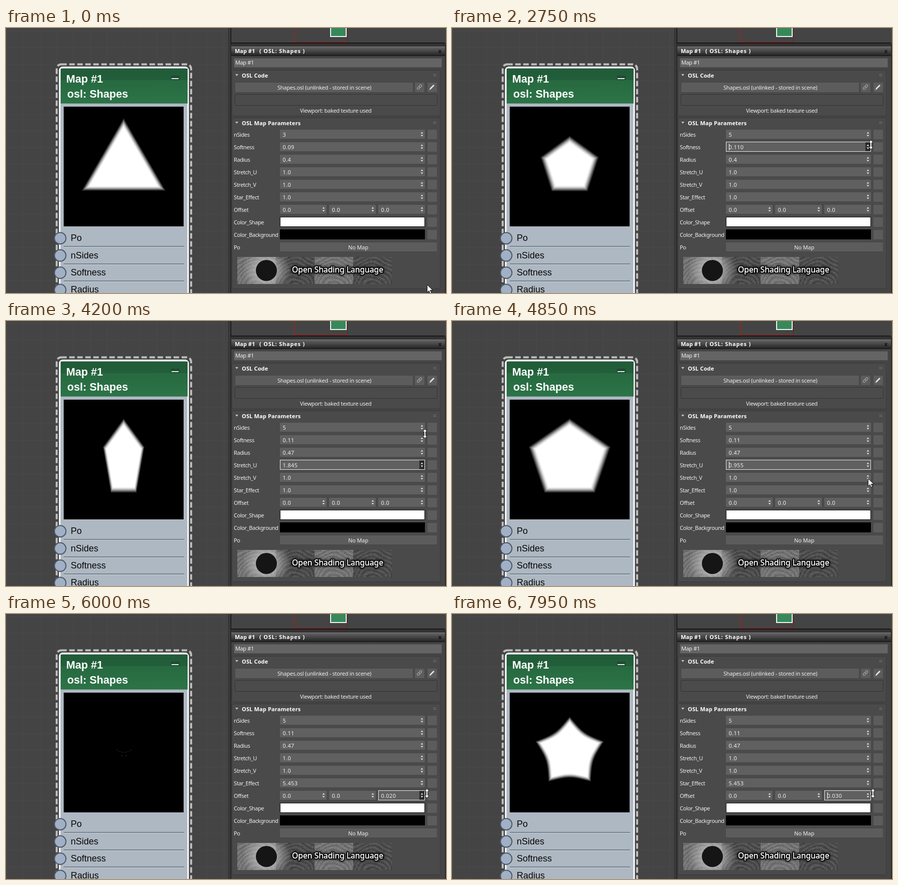
Recreate the animation shown at these times as an HTML page with a canvas. Size 877 by 529 pixels, loop 8 s.

```html
<!DOCTYPE html>
<html lang="en">
<head>
<meta charset="utf-8">
<title>Shape parameters</title>
<style>
html, body { margin: 0; width: 100%; height: 100%; overflow: hidden; background: #444; }
canvas { display: block; }
</style>
</head>
<body>
<canvas id="stage" width="877" height="529"></canvas>
<script>
const W = 877, H = 529, LOOP = 8000, STEP = 50, SIZE = 239;
const UI = '"Noto Sans", sans-serif', NODE = '"Liberation Sans", sans-serif';
const stage = document.getElementById('stage').getContext('2d');
const back = document.createElement('canvas');
back.width = W;
back.height = H;
let c = back.getContext('2d');

const clamp = v => Math.min(1, Math.max(0, v));
const lerp = (a, b, k) => a + (b - a) * k;
const smooth = (a, b, v) => {
  const k = clamp((v - a) / (b - a));
  return k * k * (3 - 2 * k);
};
const rowY = row => 212 + row * 25;

function rect(x, y, w, h, fill) {
  c.fillStyle = fill;
  c.fillRect(x, y, w, h);
}
function box(x, y, w, h, r, fill, line, width = 1) {
  c.beginPath();
  c.roundRect(x, y, w, h, r);
  if (fill) { c.fillStyle = fill; c.fill(); }
  if (line) { c.strokeStyle = line; c.lineWidth = width; c.stroke(); }
}
function poly(points, fill, line) {
  c.beginPath();
  points.forEach(([x, y]) => c.lineTo(x, y));
  c.closePath();
  c.fillStyle = fill;
  c.fill();
  if (line) { c.strokeStyle = line; c.lineWidth = 1; c.stroke(); }
}
function disc(x, y, r, fill, line) {
  c.beginPath();
  c.arc(x, y, r, 0, 7);
  c.fillStyle = fill;
  c.fill();
  if (line) { c.strokeStyle = line; c.lineWidth = 2; c.stroke(); }
}
function text(s, x, y, { size = 11, bold = false, font = UI, color = '#f0f0f0', gap = -0.4, align = 'left' } = {}) {
  c.font = `${bold ? 'bold ' : ''}${size}px ${font}`;
  c.letterSpacing = gap + 'px';
  c.textAlign = align;
  c.fillStyle = color;
  c.fillText(s, x, y);
}
function vertical(y0, y1, ...colors) {
  const g = c.createLinearGradient(0, y0, 0, y1);
  colors.forEach((col, i) => g.addColorStop(i / (colors.length - 1), col));
  return g;
}

// ---- Static interface ----
function drawNode() {
  rect(0, 0, 444, H, '#444444');
  for (let i = 0; i < 16; i++) {
    rect(Math.round(1 + i * 33.3), 0, 1, H, '#494949');
    rect(0, Math.round(5 + i * 33.3), 444, 1, '#494949');
  }
  c.setLineDash([11, 5]);
  box(101, 72.5, 268, 520, 9, null, '#bcbcbc', 4);
  c.setLineDash([]);
  box(107, 78.5, 256, 520, 6, '#aeb8c2', '#ffffff', 3);
  rect(109, 81, 253, 70, vertical(81, 151, '#27643f', '#286c42', '#2c7447'));
  rect(109, 81, 253, 23, 'rgba(20,70,40,.3)');
  rect(109, 150, 253, 1, '#55856a');
  rect(329, 95, 17, 9, '#1d4b30');
  rect(330, 100, 14, 2, '#e4ece7');
  const head = { size: 21.6, bold: true, font: NODE, color: '#fff', gap: 0 };
  text('Map #1', 120, 109, head);
  text('osl: Shapes', 122, 139, head);
  ['Po', 'nSides', 'Softness', 'Radius'].forEach((s, i) => {
    const y = 419.7 + i * 34.4;
    text(s, 129, Math.round(y + 5.5), { size: 18, font: NODE, color: '#080808', gap: 0 });
    rect(115, Math.round(y + 15.5), 240, 2, '#74828f');
    rect(115, Math.round(y + 17.5), 240, 1, '#cbd3da');
    disc(108, y, 11.5, '#a2b0c6', '#4b5969');
  });
}

function spinner(x, y, bg) {
  if (bg) rect(x - 5, y - 9, 10, 18, bg);
  [-1, 1].forEach(s => poly([[x - 2.5, y + s * 1.5], [x + 2.5, y + s * 1.5], [x, y + s * 4.5]], '#e8e8e8'));
}
function button(x, y, w, h) {
  box(x, y, w, h, 2, '#5c5c5c', '#484848');
}
function section(y, h, title) {
  box(450.5, y + 0.5, 415, h, 3, '#4a4a4a', '#3a3a3a');
  poly([[457, y + 8], [463, y + 8], [460, y + 12]], '#c4c4c4');
  text(title, 470, y + 15, { bold: true, gap: 0.15, color: '#fff' });
  for (let i = 0; i < 6; i++) rect(852 + i % 3 * 2, y + 8 + (i / 3 | 0) * 3, 1, 1, '#a0a0a0');
}

function drawBanner() {
  let seed = 7;
  const rnd = () => (seed = seed * 16807 % 2147483647) / 2147483647;
  for (let y = 0; y < 54; y++) for (let x = 0; x < 308; x++) {
    const tile = x / 77 | 0, u = x % 77;
    const wave = Math.sin(Math.hypot(u - 38, y - 60) * 0.8 + 2 * Math.sin(u / 9 + y / 14));
    const v = (tile % 2 ? 78 : 116) + wave * 11 + (rnd() - 0.5) * 30;
    rect(461 + x, 457 + y, 1, 1, `rgb(${v | 0},${v | 0},${v | 0})`);
  }
  const glow = c.createRadialGradient(519, 484, 14, 519, 484, 48);
  glow.addColorStop(0, 'rgba(205,205,205,.75)');
  glow.addColorStop(1, 'rgba(205,205,205,0)');
  rect(461, 457, 116, 54, glow);
  disc(519, 484, 21, '#151515');

  const title = 'Open Shading Language', style = { size: 15.7, gap: 0, color: '#fff' };
  c.save();
  c.shadowColor = '#000';
  c.shadowBlur = 5;
  c.lineJoin = 'round';
  c.strokeStyle = '#000';
  c.lineWidth = 3.5;
  text(title, 570, 488, style);
  c.strokeText(title, 570, 488);
  c.restore();
  text(title, 570, 488, style);
  c.strokeStyle = '#fff';
  c.lineWidth = 0.4;
  c.strokeText(title, 570, 488);
}

function drawPanel() {
  rect(443, 0, 6, H, '#2c2c2c');
  rect(444, 0, 3, H, '#3b3b3b');
  rect(449, 0, 428, H, '#444444');
  rect(448, 0, 1, 31, '#111');
  rect(449, 29, 426, 2, '#1a1a1a');
  rect(574, 28, 106, 1, '#a81010');
  rect(680, 0, 1, 29, '#6a2424');
  rect(574, 0, 1, 29, '#d40d0d');
  rect(646, 0, 33, 18, '#f2f2f2');
  rect(648, 0, 29, 16, '#37895a');

  rect(449, 31, 426, 6, '#333');
  rect(449, 37, 426, 19, vertical(37, 56, '#666', '#444', '#202020'));
  rect(449, 37, 426, 1, '#7c7c7c');
  rect(449, 55, 426, 1, '#161616');
  const title = { bold: true, gap: 0, color: '#fff' };
  text('Map #1', 456, 50, title);
  text('( OSL: Shapes )', 505, 50, { ...title, gap: 0.8 });
  text('x', 865, 50, { ...title, align: 'center', color: '#111' });
  rect(875, 31, 2, H, '#2a2a2a');
  rect(448, 37, 1, H, '#222');

  box(454.5, 60.5, 414, 18, 1, '#646464', '#525252');
  text('Map #1', 457, 73);

  section(84, 91, 'OSL Code');
  button(456.5, 108.5, 355, 20);
  text('Shapes.osl (unlinked - stored in scene)', 541, 123, { gap: -0.25 });
  button(814.5, 108.5, 20, 20);
  button(839.5, 108.5, 20, 20);
  c.save();
  c.translate(824, 118);
  c.rotate(-0.8);
  [-5.5, 0].forEach(x => box(x, -2, 6, 4, 2, null, '#a5a5a5', 1.2));
  c.restore();
  poly([[844, 124], [845, 120], [852, 113], [854, 115], [847, 122]], '#e0e0e0');
  box(456.5, 132.5, 403, 22, 1, '#4b4b4b', '#343434');
  text('Viewport: baked texture used', 586, 169, { gap: -0.32 });

  section(179, 341, 'OSL Map Parameters');
  ['nSides', 'Softness', 'Radius', 'Stretch_U', 'Stretch_V', 'Star_Effect',
    'Offset', 'Color_Shape', 'Color_Background', 'Po'].forEach((s, i) => {
    const y = rowY(i);
    text(s, 454, y + 5);
    if (i < 6) box(546, y - 9, 289, 18, 1, '#606060');
    if (i === 6) [546, 644, 742].forEach(x => box(x, y - 9, 93, 18, 1, '#606060'));
    if (i < 9) button(839.5, y - 9.5, 20, 20);
  });
  rect(546, 377, 289, 20, '#111');
  rect(547, 378, 287, 18, '#fff');
  rect(546, 402, 289, 20, '#000');
  button(545.5, 427.5, 314, 19);
  text('No Map', 702, 442, { align: 'center', gap: -0.1 });
  drawBanner();
}

// ---- Motion ----
// Each drag swings a value away and settles it at its new setting
const OFFSET = 6;
const DRAGS = [
  { row: 1, from: 0.09, to: 0.11, swing: 0.8, start: 1500, end: 2600, step: 0.01 },
  { row: 2, from: 0.4, to: 0.47, swing: 0.35, start: 2950, end: 3475, step: 0.01 },
  { row: 3, from: 1, to: 0.955, swing: 0.9, start: 3850, end: 4450, step: 0.005 },
  { row: 4, from: 1, to: 0.9, swing: 0.6, start: 4950, end: 5200, step: 0.005 },
  { row: 5, from: 1, to: 5.453, swing: 0, start: 5550, end: 5700, step: 0.001 },
  { row: OFFSET, from: 0, to: 0.02, swing: 0.3, start: 5850, end: 6000, step: 0.01 },
  { row: OFFSET, from: 0.02, to: 0.03, swing: -0.03, start: 6300, end: 6600, step: 0.01 },
  { row: OFFSET, from: 0.03, to: 0.03, swing: 0.03, start: 7250, end: 7600, step: 0.01 }
];
DRAGS.forEach((d, i) => {
  const next = DRAGS[i + 1];
  d.release = Math.min(d.end + 300, next ? next.start - 50 : LOOP);
});
const SELECT = 850, TYPED = 1000, RESET = 5450, SPIN_X = 835;

const progress = (d, t) => clamp((t - d.start) / (d.end - d.start));
const lastDrag = t => DRAGS.filter(d => t >= d.start).pop();
const isHeld = t => {
  const d = lastDrag(t);
  return !!d && t < d.release;
};

function value(row, t) {
  if (row === 0) return t < TYPED ? 3 : 5;
  if ((row === 3 || row === 4) && t >= RESET) return 1;
  const own = DRAGS.filter(d => d.row === row);
  const d = own.filter(o => t >= o.start).pop() || own[0];
  const k = progress(d, t);
  if (k === 0 || k === 1) return k ? d.to : d.from;
  const v = lerp(d.from, d.to, k) + d.swing * Math.sin(Math.PI * k);
  return Math.round(v / d.step) * d.step;
}

function drawShape(t) {
  const [n, soft, radius, su, sv, star, z] = [0, 1, 2, 3, 4, 5, 6].map(row => value(row, t - STEP));
  const img = c.createImageData(SIZE, SIZE), px = img.data, half = (SIZE - 1) / 2;
  const hidden = t >= 5950 && t < 6100;
  const mid = (radius - 0.4) * 240 + 43.5, soften = soft * 60;
  const pinch = (star - 1) / 4.453 * 0.155, shrink = 1 + 0.14 * (z / 0.03) ** 2;
  const slice = 2 * Math.PI / n;
  for (let j = 0, k = 0; j < SIZE; j++) for (let i = 0; i < SIZE; i++, k += 4) {
    px[k + 3] = 255;
    if (hidden) continue;
    const x = (i - half) * su, y = (j - half) * sv;
    let a = Math.atan2(x, y);
    a -= slice * Math.round(a / slice);
    const q = 2 * a / slice;
    const d = Math.hypot(x, y) * Math.cos(a) * shrink * (1 + pinch * (1 - q * q));
    px[k] = px[k + 1] = px[k + 2] = 255 * (1 - smooth(mid - soften, mid + soften, d)) ** 0.6;
  }
  c.putImageData(img, 115, 157);
  if (hidden) {
    for (let i = -2.5; i < 3; i++) rect(234 + i * 5.4, 275.5 - i * i * 0.7, 2, 1.5, '#2c2c2c');
    [230, 238].forEach(x => rect(x, 282, 2, 1.5, '#282828'));
  }
}

function plain(v) {
  const s = String(+v.toFixed(3));
  return s.includes('.') ? s : s + '.0';
}

function drawFields(t) {
  const drag = lastDrag(t), held = isHeld(t);
  const focus = drag ? drag.row : t >= SELECT ? 0 : -1;
  const caret = drag && t >= drag.end + 100 && (t % 650 < 400 || t % 650 >= 550);
  const field = (x, y, w, s, on) => {
    spinner(x + w - 6, y, on && held ? '#2a2a2a' : null);
    if (on) {
      c.strokeStyle = '#ededed';
      c.lineWidth = 1;
      c.strokeRect(x + 0.5, y - 9.5, w - 1, 19);
      if (!drag) rect(552, y - 6, 7, 13, '#2a8ae8');
    }
    text(s, x + 5.5, y + 5, { gap: 0.35 });
    if (on && caret) rect(x + 6, y - 6, 1, 13, '#fff');
  };
  for (let row = 0; row <= OFFSET; row++) {
    const v = value(row, t), on = row === focus, wide = row < OFFSET;
    const s = row === 0 ? String(v) : on ? v.toFixed(3) : plain(v);
    field(wide ? 546 : 742, rowY(row), wide ? 289 : 93, s, on);
  }
  [546, 644].forEach(x => field(x, rowY(OFFSET), 93, '0.0', false));
}

// Opening sweep: rest, node title, first field, on to the spinners
const SWEEP = [[200, 839, 512], [350, 232, 134], [650, 600, 213], [1150, 600, 213], [1400, 782, 247], [1500, 829, 238]];

function pointerAt(t) {
  const d = lastDrag(t);
  if (!d) {
    const i = SWEEP.findIndex(p => p[0] > t), b = SWEEP[i], a = SWEEP[Math.max(0, i - 1)];
    const k = clamp((t - a[0]) / (b[0] - a[0] || 1));
    return i ? [lerp(a[1], b[1], k), lerp(a[2], b[2], k)] : [a[1], a[2]];
  }
  const lift = d.swing ? 60 * Math.sin(Math.PI * progress(d, t)) : 0;
  const x = d.row === OFFSET ? SPIN_X + 4 : SPIN_X, y = rowY(d.row) - 4.5 - lift;
  const next = DRAGS[DRAGS.indexOf(d) + 1];
  const k = next && next.row !== d.row ? clamp((t - d.release) / 100) : 0;
  return k ? [lerp(x, SPIN_X - 6, k), lerp(y, rowY(next.row) + 2, k)] : [x, y];
}

function drawPointer(t) {
  const [x, y] = pointerAt(t).map(Math.round);
  c.save();
  c.translate(x, y);
  if (t >= 600 && t < 1450) {
    rect(0, -7, 1, 15, '#c4c4c4');
    [-8, 8].forEach(b => [-3, 1].forEach(a => rect(a, b, 3, 1, '#c4c4c4')));
  } else if (isHeld(t) || t >= 5850) {
    poly([[0, -9.5], [4.5, -4], [1.5, -4], [1.5, 4], [4.5, 4], [0, 9.5],
      [-4.5, 4], [-1.5, 4], [-1.5, -4], [-4.5, -4]], '#fff', '#222');
  } else {
    poly([[0.5, 0.5], [0.5, 16], [4, 12.5], [6.5, 18], [9, 17], [6.5, 11.5], [11.5, 11.5]], '#fff', '#111');
  }
  c.restore();
}

drawNode();
drawPanel();
c = stage;
const begin = performance.now();
let last = -1;
function frame() {
  const t = Math.floor((performance.now() - begin) % LOOP / STEP) * STEP;
  if (t !== last) {
    last = t;
    c.drawImage(back, 0, 0);
    drawShape(t);
    drawFields(t);
    drawPointer(t);
  }
  requestAnimationFrame(frame);
}
frame();
</script>
</body>
</html>
```
